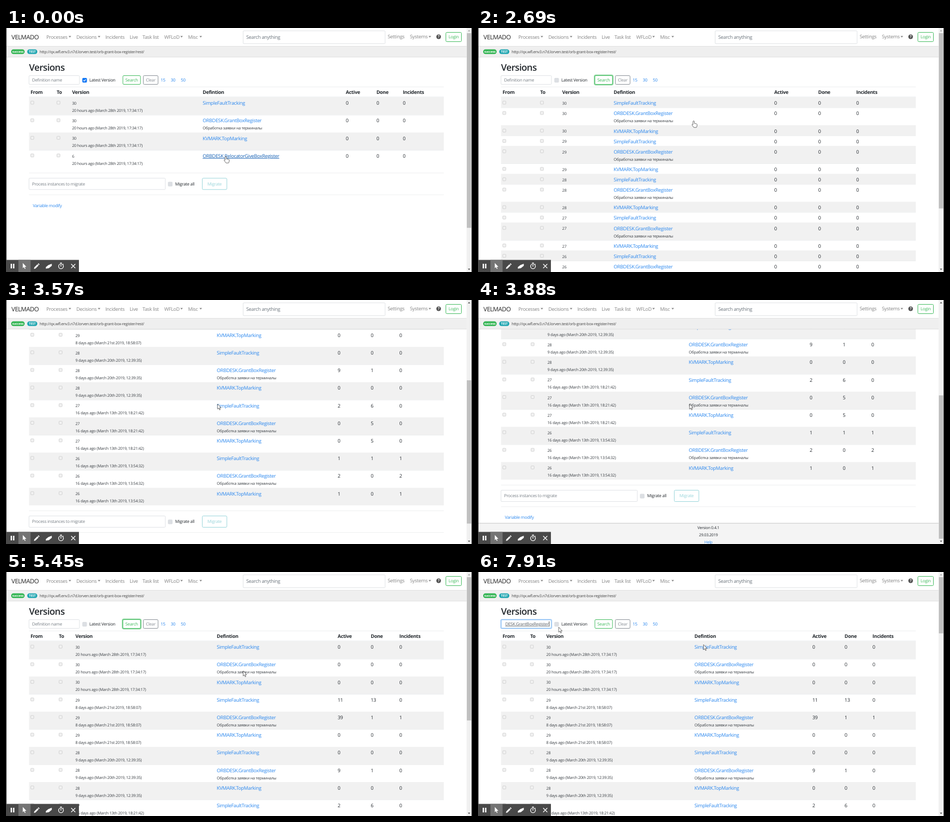
An HTML page for the animation above (8 s loop, 901 by 474 pixels).

```html
<!DOCTYPE html>
<html lang="en">
<head>
<meta charset="utf-8">
<style>
html, body { margin: 0; width: 100%; height: 100%; overflow: hidden; background: #fff; }
svg { display: block; }
text {
  font-family: "Open Sans", "Noto Sans", sans-serif;
  letter-spacing: -.033em;
  white-space: pre;
  text-rendering: geometricPrecision;
}
</style>
</head>
<body>
<svg id="stage" width="901" height="474" viewBox="0 0 901 474"></svg>
<script>
const LOOP = 8000, STEP = 144, START = 60;
const BASE = 9.43, MID = 8.25, SMALL = 7.6;
const GREEN = '#3cb95a', TEAL = '#1ea5b0', BLUE = '#2a87ee', HOVER = '#1762b5';
const INK = '#24292e', GRAY = '#6c757d', NAV = '#858585', LINE = '#dfe2e5';
const LEFT = 44.5, WIDTH = 802, TABLE_TOP = 134.5, TALL = 34.2, SHORT = 20.1;

// Screen updates at which something happens
const UNCHECK = 6, CLICK = 11, LOADED = 12, DATED = 19, PICK = 42, PICKED = 44, FOCUS = 52, PASTE = 53;

// Each move: first step, last step, goal
const cursorMoves = [
  [0, 4, 152, 101], [8, 10, 238, 109], [11, 15, 417, 180], [18, 24, 409, 202],
  [26, 31, 575, 284], [34, 40, 342, 100], [42, 45, 436, 141], [45, 49, 105, 101], [52, 54, 156, 107]
];
const scrollMoves = [[19, 24, 248.5], [24, 26, 298.5], [31, 33, 0]];

const follow = (moves, start, n) => moves.reduce((at, [a, b, ...goal]) => {
  const p = Math.min(1, Math.max(0, (n - a) / (b - a)));
  return at.map((v, i) => v + (goal[i] - v) * p);
}, start);

const names = ['SimpleFaultTracking', 'ORBDESK.GrantBoxRegister', 'KVMARK.TopMarking'];
const note = 'Обработка заявки на терминалы';
const releases = [
  { date: '20 hours ago (March 28th 2019, 17:34:17)' },
  { date: '8 days ago (March 21st 2019, 18:58:07)', counts: [[11, 13, 0], [39, 1, 1]] },
  { date: '9 days ago (March 20th 2019, 12:39:35)', counts: [, [9, 1, 0]] },
  { date: '16 days ago (March 13th 2019, 18:21:42)', counts: [[2, 6, 0], [0, 5, 0], [0, 5, 0]] },
  { date: '16 days ago (March 13th 2019, 13:54:32)', counts: [[1, 1, 1], [2, 0, 2], [1, 0, 1]] },
  { date: '2 months ago (February 12th 2019, 15:20:08)' }
];

function makeRow(i) {
  const age = Math.floor(i / 3), kind = i % 3;
  const { date, counts = [] } = releases[Math.min(age, releases.length - 1)];
  return { version: 30 - age, name: names[kind], note: kind === 1 ? note : '', date, counts: counts[kind] || [0, 0, 0] };
}

// Columns share the width in proportion to their longest content
function makeView(rows, dated) {
  const longest = key => Math.max(...rows.map(r => r[key].length));
  const sizes = [50.5, 29.5, dated ? 6.3 * longest('date') : 69, 33 + 7.6 * longest('name'), 59, 51, 82];
  const scale = WIDTH / sizes.reduce((a, b) => a + b);
  let x = LEFT + 3;
  const cols = sizes.map(size => (x += size * scale) - size * scale);
  const rowHeight = row => dated || row.note ? TALL : SHORT;
  const end = rows.reduce((y, row) => y + rowHeight(row), TABLE_TOP);
  return { rows, dated, cols, rowHeight, end, height: Math.max(569, end + 125.5) };
}

const rowList = count => Array.from({ length: count }, (_, i) => makeRow(i));
const latest = makeView([...rowList(3), { ...makeRow(0), version: 6, name: 'ORBDESK.RelocatorGiveBoxRegister' }], true);
const [bare, full, longBare, longFull] =
  [[15, false], [15, true], [50, false], [50, true]].map(([count, dated]) => makeView(rowList(count), dated));

// y is the middle of the capital letters
const text = (x, y, s, size = BASE, fill = INK, more = '') =>
  `<text x="${x}" y="${y + size * .34}" font-size="${size}" fill="${fill}" ${more}>${s}</text>`;
const rect = (x, y, w, h, fill, stroke = 'none', r = 0, more = '') =>
  `<rect x="${x}" y="${y}" width="${w}" height="${h}" rx="${r}" fill="${fill}" stroke="${stroke}" ${more}/>`;
const path = (d, fill = 'none', stroke = 'none', more = '') =>
  `<path d="${d}" fill="${fill}" stroke="${stroke}" ${more}/>`;
const center = 'text-anchor="middle"', bold = ' font-weight="700"', under = ' text-decoration="underline"';
const caret = x => path(`M${x} 15.5h5l-2.5 3z`, NAV);
const rule = (y, color = '#e8eaec') => rect(LEFT, y, WIDTH, .8, color);
const button = (x, y, w, h, label, color, size = MID, fill = '#fff', ink = color) =>
  rect(x, y, w, h, fill, color, 2) + text(x + w / 2, y + h / 2, label, size, ink, center);
const field = (x, y, w, h, label, size = MID, color = '#777e85') =>
  rect(x, y, w, h, '#fff', LINE, 1.5) + text(x + 6, y + h / 2, label, size, color);
const toggle = (x, y, fill = '#dcdfe3') => rect(x, y, 9, 9, fill, 'none', 2);
const tick = (x, y) => rect(x, y, 6, 6, '#f1f1f1', '#c9c9c9', 1, 'stroke-width=".8"');
const link = (x, y, s, size, hover) => text(x, y, s, size, hover ? HOVER : BLUE, hover ? under : '');

function filters(n) {
  let s = text(LEFT, 77, 'Versions', 17.9, INK, 'font-weight="600"');
  s += field(44.5, 92.5, 97.5, 17, n < PASTE ? 'Definition name' : '');
  if (n >= FOCUS) {
    s += rect(44.5, 92.5, 97.5, 17, 'none', '#cfe4fb', 2, 'stroke-width="3"') +
      rect(44.5, 92.5, 97.5, 17, 'none', '#86bcf3', 1.5);
  }
  if (n >= PASTE) {
    s += text(136.5, 101, 'DESK.GrantBoxRegister', MID, '#596067', 'text-anchor="end"' + under) +
      rect(137, 96, .8, 10, '#222');
  }
  if (n >= UNCHECK && n < CLICK) s += rect(146, 95.5, 12, 12, '#cfe2f3', 'none', 3);
  s += toggle(147.5, 97, n < UNCHECK ? '#1479f5' : undefined);
  if (n < UNCHECK) s += path('M149.7 101.5l1.6 1.7 3-3.4', 'none', '#fff', 'stroke-width="1.2"');
  s += text(161, 101, 'Latest Version', MID);

  if (n >= CLICK && n < PICK) s += rect(225.5, 92, 35, 18, 'none', '#8fd8a0', 2.5, 'stroke-width="3"');
  const overSearch = n >= 10 && n <= CLICK;
  s += button(226, 92.5, 34, 17, 'Search', GREEN, MID, ...(overSearch ? ['#2bb24c', '#fff'] : []));
  s += button(265.5, 92.5, 28.5, 17, 'Clear', '#858c93');
  return s + [15, 30, 50].map((size, i) =>
    link(299 + 19.5 * i, 101, size, MID, i === 2 && n >= 40 && n < FOCUS)).join('');
}

function table(view, n) {
  const [from, to, version, name, ...numbers] = view.cols;
  let y = TABLE_TOP;
  let s = rule(114.2) + rule(133.6, LINE) +
    ['From', 'To', 'Version', 'Defintion', 'Active', 'Done', 'Incidents']
      .map((h, i) => text(view.cols[i], 125, h, BASE, INK, bold)).join('');
  view.rows.forEach((row, i) => {
    const h = view.rowHeight(row), mid = y + 11.5;
    const hover = (view === latest && i === 3 && n < 1) || (view === bare && i === 0 && n < 16);
    s += i % 2 ? rule(y) : rect(LEFT, y, WIDTH, h, '#f1f1f1');
    s += tick(from + .3, mid - 4) + tick(to + .3, mid - 4);
    s += text(version, mid + .5, row.version, SMALL, '#3a3f44');
    if (view.dated) s += text(version, mid + 14.5, row.date, SMALL, '#3a3f44');
    s += link(name, mid, row.name, BASE, hover);
    if (row.note) s += text(name, mid + 14.7, row.note, SMALL, '#3a3f44');
    s += numbers.map((x, j) => text(x, mid, view.dated ? row.counts[j] : 0)).join('');
    y += h;
  });
  return s;
}

function below({ end: y, height }) {
  const foot = height - 41.5;
  return rule(y + 10) + field(44.5, y + 20.5, 263.5, 22, 'Process instances to migrate') +
    toggle(313, y + 27.5) + text(327, y + 31.5, 'Migrate all', MID) +
    button(379.5, y + 20.5, 47.5, 22, 'Migrate', '#97d4da') +
    rule(y + 52.3) + link(52, y + 73.5, 'Variable modify', MID) +
    rect(0, foot, 891, 50, '#f4f4f4') + rect(0, foot, 891, 1.2, '#cfcfcf') +
    text(445.5, foot + 9.5, 'Version 0.4.1', SMALL, INK, center) +
    text(445.5, foot + 23.5, '29.03.2019', SMALL, INK, center) +
    text(445.5, foot + 37.5, 'Help', SMALL, BLUE, center + under);
}

function header() {
  let s = rect(0, 0, 891, 36, '#fff') + rect(0, 35.5, 891, 21, '#efefef') +
    rect(0, 35, 891, .8, '#dcdcdc') + rect(0, 56, 891, .8, '#dadada');
  s += text(10.5, 18, 'VELMADO', 11.8, '#222');
  [[78, 'Processes', 121], [136, 'Decisions', 177.5], [192, 'Incidents'], [239, 'Live'], [264, 'Task list'],
    [306, 'WFLoD', 337], [352, 'Misc', 374], [738, 'Settings'], [781, 'Systems', 817]].forEach(([x, label, arrow]) => {
    s += text(x, x > 700 ? 17 : 18, label, BASE, NAV) + (arrow ? caret(arrow) : '');
  });
  s += field(458.5, 5.5, 274.5, 25, 'Search anything', BASE, GRAY);
  s += '<circle cx="836.5" cy="17" r="4.5" fill="#555"/>' + text(836.5, 17, '?', 7, '#fff', center + bold);
  s += button(850.5, 8.5, 30, 18, 'Login', GREEN);
  s += rect(10, 41.5, 26, 9, '#2bb24c', 'none', 4.5) + text(23, 45.7, 'success', 6.2, '#fff', center + bold);
  s += rect(41, 41.5, 19.5, 9, TEAL, 'none', 4.5) + text(50.7, 46, 'TEST', 6.2, '#fff', center + bold);
  return s + text(65, 46, 'http://qx.wfl.env3.n7d.lorven.test/orb-grant-box-register/rest/', SMALL, '#444');
}

function scrollbar({ height }, scroll) {
  const scale = 454 / height;
  return rect(890.5, 0, 10, 474, '#f1f1f1') + rect(891, 10 + scroll * scale, 8.5, 474 * scale, '#c0c0c0') +
    path('M893 6.5h4.6l-2.3-2.8z', scroll ? '#505050' : '#a5a5a5') + path('M893 467.5h4.6l-2.3 2.8z', '#505050') +
    rect(0, 0, 1, 474, '#222') + rect(900, 0, 1, 474, '#333');
}

function toolbar() {
  const line = 'stroke-width="1.4"';
  return rect(0, 450.5, 141, 23.5, '#494949') + rect(24, 450.5, 23.5, 23.5, '#747474') +
    path('M9 458h2.6v9H9zM13.6 458h2.6v9h-2.6z', '#fff') +
    path('M32.5 456.5v10l2.2-2 1.6 3.6 1.5-.7-1.6-3.4h3.2z', '#fff') +
    path('M54 468l.8-3 6-6 2.2 2.2-6 6zM61.5 458.2l1.3-1.2 2.2 2.2-1.3 1.2z', '#fff') +
    path('M77 464.5l5-4 6.5-2.5v4l-5.5 4.5-6 1z', '#fff') +
    `<circle cx="106.3" cy="463" r="4.6" fill="none" stroke="#fff" ${line}/>` +
    path('M104.5 456.5h3.6M106.3 460v3.4M110 458.5l1.2 1M126 458.5l8 8M134 458.5l-8 8', 'none', '#fff', line);
}

const outline = ['#fff', '#444', 'stroke-width=".8"'];
const shapes = {
  arrow: path('M0 0v10l2.3-2 1.6 3.6 1.5-.7-1.6-3.4h3z', ...outline),
  hand: path('M0 .5c.9 0 1.3.6 1.3 1.3v3.4l4 .9c1 .2 1.5.9 1.4 1.9l-.6 3.6-.8 1.6h-5L-3 8.6c-.8-1 .2-2 1.1-1.4l.6.6v-6C-1.3 1-.9.5 0 .5z', ...outline),
  beam: path('M-2-5h4M0-5v10M-2 5h4', ...outline)
};
const pointer = (kind, x, y) => `<g transform="translate(${x} ${y})">${shapes[kind]}</g>`;

function pointers(n) {
  const hand = n < 1 || (n >= 10 && n < DATED) || (n >= 40 && n <= PICK);
  const kind = hand ? 'hand' : n >= 49 && n < FOCUS ? 'beam' : 'arrow';
  return (n >= 45 ? pointer('arrow', 436, 141) : '') + pointer(kind, ...follow(cursorMoves, [425, 249], n));
}

function draw(n) {
  const view = n < LOADED ? latest : n < DATED ? bare : n < PICK ? full : n < PICKED ? longBare : longFull;
  const [scroll] = follow(scrollMoves, [0], n);
  return `<g transform="translate(0 ${-scroll})">${filters(n)}${table(view, n)}${below(view)}</g>` +
    header() + scrollbar(view, scroll) + toolbar() + pointers(n);
}

const stage = document.getElementById('stage');
let shown;
function frame() {
  const n = Math.floor((performance.now() % LOOP - START) / STEP);
  if (n !== shown) stage.innerHTML = draw(shown = n);
  requestAnimationFrame(frame);
}
frame();
</script>
</body>
</html>
```
